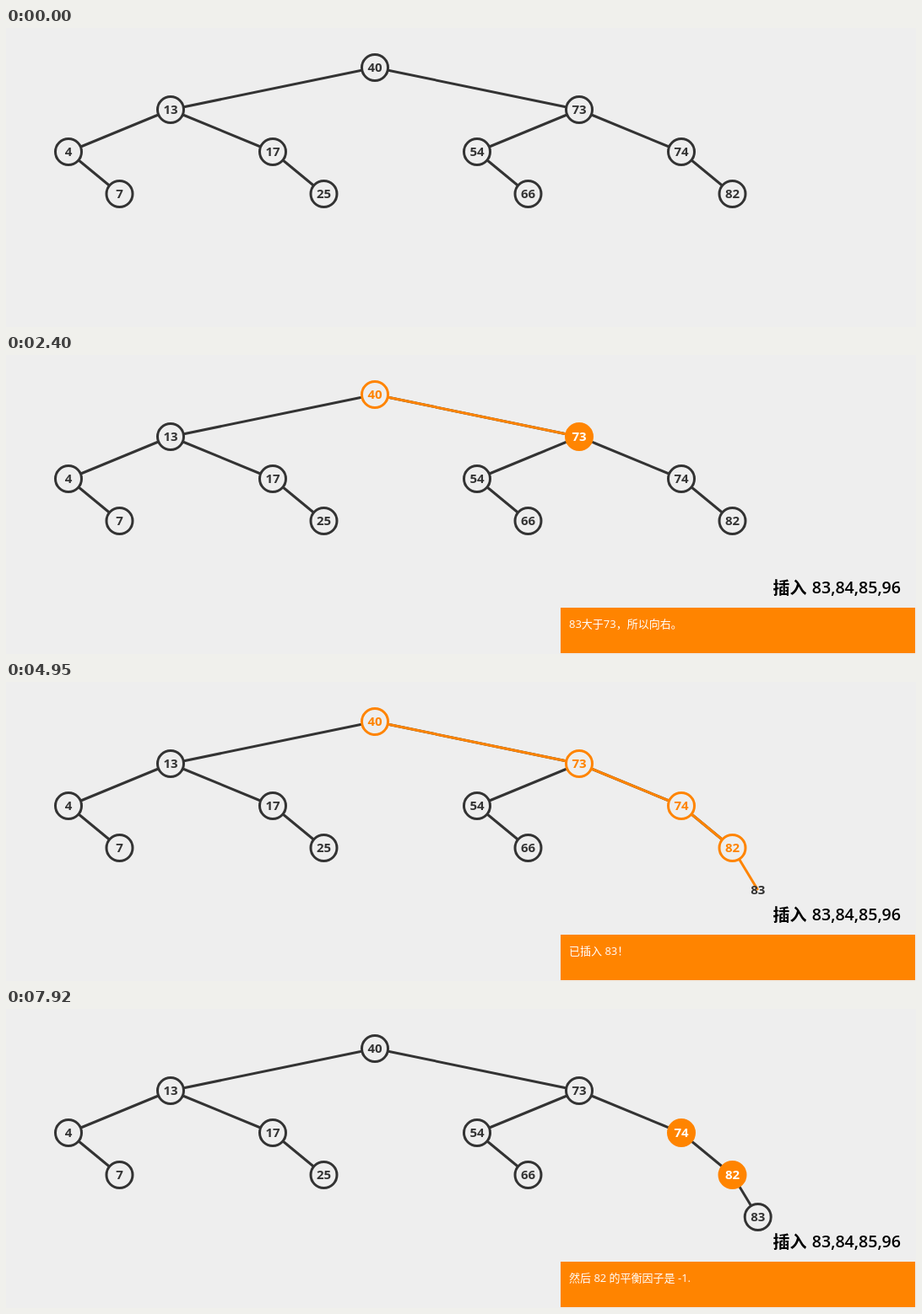
An HTML page that plays this animation: 1078x355 px, repeating every 8 s.

```html
<!DOCTYPE html>
<html lang="zh-CN">
<head>
<meta charset="utf-8">
<title>AVL 插入</title>
<style>
  html, body { margin: 0; width: 100%; height: 100%; overflow: hidden; background: #eee; }
  svg { display: block; width: 1078px; height: 355px; }
  text { font-family: "Open Sans", "Noto Sans", "Noto Sans CJK SC", "Noto Sans CJK", sans-serif; }
  .node text { font-size: 15px; font-weight: 700; text-anchor: middle; }
  .title { font-size: 19.6px; font-weight: 600; }
  .title .zh { font-size: 20px; font-weight: 700; }
  .msg { font-size: 13px; fill: #fff; white-space: pre; }
</style>
</head>
<body>
<svg id="stage" viewBox="0 0 1078 355">
  <g id="edges"></g>
  <g id="nodes"></g>
  <g id="info">
    <g class="title">
      <text class="zh" x="908.5" y="283.5">插入</text>
      <text x="1060" y="283" text-anchor="end">83,84,85,96</text>
    </g>
    <rect id="panel" y="300" height="54" fill="#ff8400"/>
    <text id="msg" class="msg" y="324"></text>
  </g>
</svg>
<script>
const LOOP = 8000, FADE = 250, OPEN = 335, INSERT = 4940;
const DARK = [51, 51, 51], BG = [238, 238, 238], ORANGE = [255, 132, 0], WHITE = [255, 255, 255];

// ring, fill, label
const LOOK = {
  plain: [DARK, BG, DARK],
  hot: [ORANGE, ORANGE, WHITE],
  path: [ORANGE, BG, ORANGE]
};

const RESET = 5690;

// value, x, y, parent, look changes
const TREE = [
  [40, 437, 47, 0, [[890, 'hot'], [1345, 'path'], [RESET, 'plain']]],
  [13, 195, 97, 40],
  [73, 679, 97, 40, [[1905, 'hot'], [2370, 'path'], [RESET, 'plain']]],
  [4, 74, 147, 13],
  [17, 316, 147, 13],
  [54, 558, 147, 73],
  [74, 800, 147, 73, [[2935, 'hot'], [3390, 'path'], [RESET, 'plain'], [7030, 'hot']]],
  [7, 134.5, 197, 4],
  [25, 376.5, 197, 17],
  [66, 618.5, 197, 54],
  [82, 860.5, 197, 74, [[3960, 'hot'], [4420, 'path'], [RESET, 'plain'], [5977, 'hot'], [6560, 'plain'], [7640, 'hot']]],
  [83, 890.7, 247, 82, [[5450, 'hot'], [RESET, 'plain']]]
];

// start of the walk along the edge above each node
const WALK = { 73: 1345, 74: 2370, 82: 3390, 83: 4420 };

const MESSAGES = [
  [OPEN, '现在的BST'],
  [890, '将83与40进行比较'],
  [1345, '83大于40，所以向右。'],
  [1905, '将83与73进行比较'],
  [2370, '83大于73，所以向右。'],
  [2935, '将83与74进行比较'],
  [3390, '83大于74，所以向右。'],
  [3960, '将83与82进行比较'],
  [4420, '83大于82，所以向右。'],
  [INSERT, '已插入 83！'],
  [5450, '83 的平衡因子是 0.'],
  [5977, '82 的平衡因子是 -1.'],
  [7030, '74 的平衡因子是 -2.'],
  [7470, '然后 82 的平衡因子是 -1.']
];

const $ = id => document.getElementById(id);
const clamp = v => Math.max(0, Math.min(1, v));
const cubic = p => p < .5 ? 4 * p ** 3 : 1 - 4 * (1 - p) ** 3;
const swing = p => .5 - Math.cos(p * Math.PI) / 2;
const fade = (t, start) => cubic(clamp((t - start) / FADE));
const mix = (a, b, k) => a.map((v, i) => v + (b[i] - v) * k);
const rgb = c => `rgb(${c.map(Math.round)})`;

function add(parent, tag, attrs) {
  const el = document.createElementNS('http://www.w3.org/2000/svg', tag);
  set(el, attrs);
  return parent.appendChild(el);
}
function set(el, attrs) {
  for (const k in attrs) el.setAttribute(k, attrs[k]);
}

const byValue = {};
const nodes = TREE.map(([value, x, y, parent, steps = []]) => {
  const node = { value, x, y, steps, up: byValue[parent] };
  byValue[value] = node;
  if (node.up) {
    const ends = { x1: node.up.x, y1: node.up.y, x2: x, y2: y, 'stroke-width': 3 };
    node.edge = add($('edges'), 'line', ends);
    if (WALK[value]) node.trail = add($('edges'), 'line', ends);
  }
  node.group = add($('nodes'), 'g', { class: 'node' });
  node.circle = add(node.group, 'circle', { cx: x, cy: y, r: 15.5, 'stroke-width': 3 });
  node.label = add(node.group, 'text', { x, y: y + 5.3 });
  node.label.textContent = value;
  return node;
});

function lookAt(steps, t) {
  let now = LOOK.plain;
  for (const [start, name] of steps) {
    if (t < start) break;
    const k = fade(t, start);
    now = now.map((c, i) => mix(c, LOOK[name][i], k));
  }
  return now;
}

function drawEdge(n, t) {
  if (!n.edge) return;
  const isNew = n.value === 83;
  let color = DARK;
  if (n.value === 82) color = mix(DARK, ORANGE, fade(t, 6560) - fade(t, 7030));
  set(n.edge, { stroke: rgb(color), visibility: isNew && t < RESET ? 'hidden' : 'visible' });
  if (!n.trail) return;
  const start = WALK[n.value];
  const grow = fade(t, start), thin = fade(t, start + FADE);
  set(n.trail, {
    x2: n.up.x + (n.x - n.up.x) * grow,
    y2: n.up.y + (n.y - n.up.y) * grow,
    'stroke-width': 10 - 7 * thin,
    stroke: rgb(mix(ORANGE, DARK, fade(t, RESET))),
    visibility: t >= start && t < RESET + FADE ? 'visible' : 'hidden'
  });
}

function drawNode(n, t) {
  const [ring, fill, label] = lookAt(n.steps, t).map(rgb);
  set(n.circle, { stroke: ring, fill });
  set(n.label, { fill: label });
  if (n.value !== 83) return;
  const size = fade(t, INSERT);
  set(n.group, { visibility: t >= WALK[83] ? 'visible' : 'hidden' });
  set(n.circle, { r: 15.5 * size, 'stroke-width': 3 * size });
}

function drawInfo(t) {
  set($('info'), { visibility: t >= OPEN ? 'visible' : 'hidden' });
  const width = 420 * swing(clamp((t - OPEN) / 250));
  set($('panel'), { x: 1077 - width, width });
  set($('msg'), { x: 1087 - width });
  let text = '';
  for (const [start, s] of MESSAGES) if (t >= start) text = s;
  if ($('msg').textContent !== text) $('msg').textContent = text;
}

const origin = performance.now();
function frame() {
  const t = (performance.now() - origin) % LOOP;
  for (const n of nodes) {
    drawEdge(n, t);
    drawNode(n, t);
  }
  drawInfo(t);
  requestAnimationFrame(frame);
}
frame();
</script>
</body>
</html>
```
